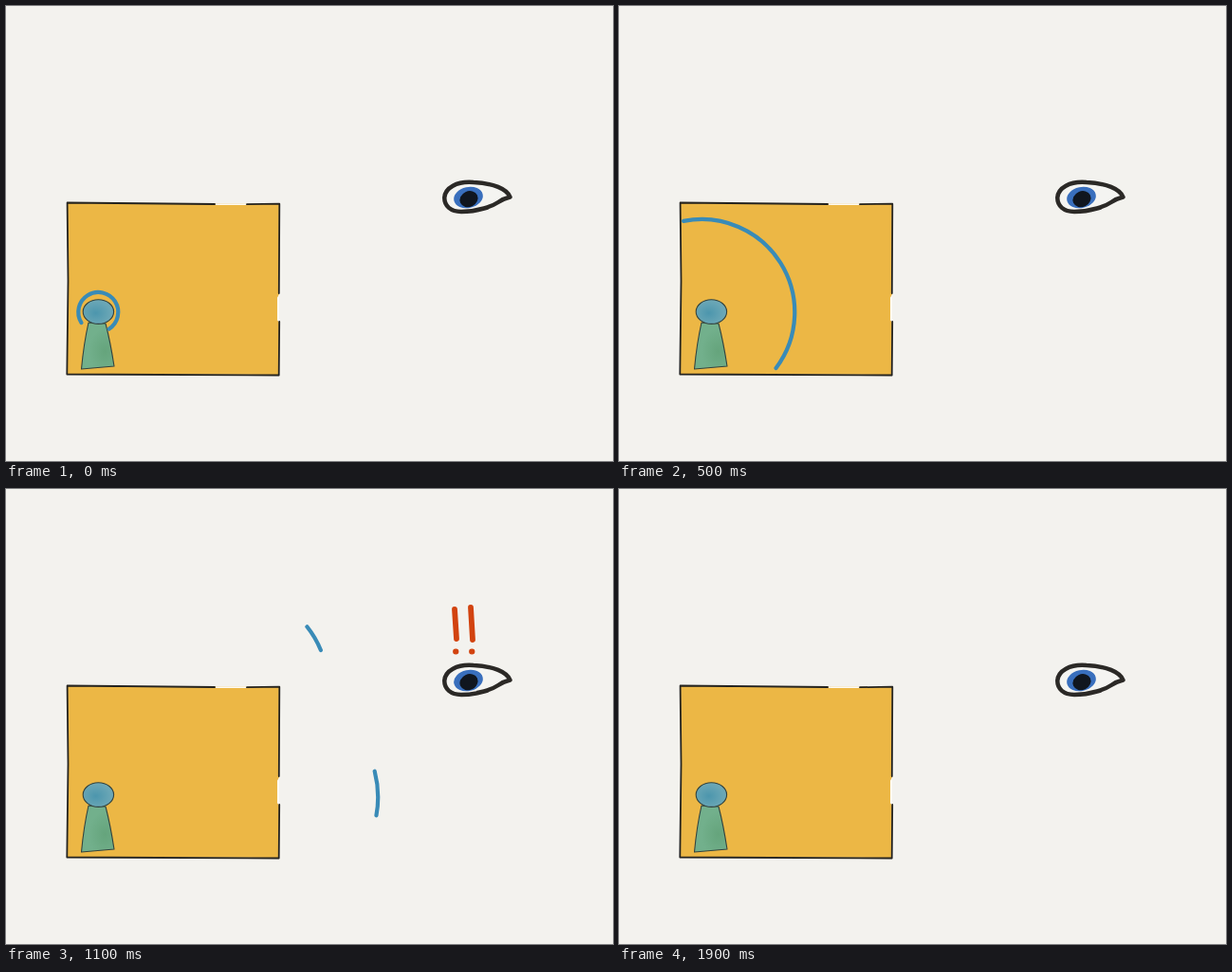
An HTML page that plays this animation: 640 by 480 pixels, repeating every 2000 ms.

```html
<!DOCTYPE html>
<html lang="en">
<head>
<meta charset="utf-8">
<title>Sound leaving a room</title>
<style>
  html, body { margin: 0; width: 100%; height: 100%; overflow: hidden; background: #f3f2ee; }
  svg { display: block; width: 100%; height: 100%; }
  path { stroke-linecap: round; stroke-linejoin: round; }
  .ink { fill: none; stroke: #24231f; stroke-width: 1.8; }
  .thin { stroke: #33433e; stroke-width: 1.1; }
  .wave { fill: none; stroke: #398bb7; stroke-width: 4.2; }
  .alert { fill: none; stroke: #d2430f; stroke-width: 5.8; }
</style>
</head>
<body>
<svg viewBox="0 0 640 480">
  <defs>
    <radialGradient id="head" cx=".42" cy=".55">
      <stop offset="0" stop-color="#4c96ad"/>
      <stop offset="1" stop-color="#6ba7b6"/>
    </radialGradient>
    <radialGradient id="robe" cx=".72" cy=".62">
      <stop offset="0" stop-color="#65a47c"/>
      <stop offset="1" stop-color="#72b08c"/>
    </radialGradient>
  </defs>

  <path fill="#ecb745" d="M65 208 288 209V304L286 308V331L288 334V389L65 388Z"/>
  <path fill="#fdfaf1" d="M286 308 288 305V333L286 331ZM221 208.5H254V210H221Z"/>
  <path class="ink" d="M220 209 64.600 207.500 65.500 290 64.300 388.500 287.700 389.500 288.200 333M254 209.200 288.300 208.700 287.800 303"/>

  <path class="thin" fill="url(#robe)" d="M87 334Q82 356 79.500 383L114 380Q110 354 105 335Z"/>
  <ellipse class="thin" fill="url(#head)" cx="97.400" cy="322.600" rx="16.200" ry="12.800"/>

  <path fill="#f4f4f1" stroke="#2b2926" stroke-width="4.500"
    d="M531.500 201.500C528 193 514 187 493 186C475 184.500 463 192 462.300 202C462 211 469 217 480 217C498 217 513 211 519 207Q525 203 531.500 201.500Z"/>
  <ellipse fill="#396fbd" cx="487.500" cy="202" rx="15.500" ry="11" transform="rotate(-12 487.500 202)"/>
  <ellipse fill="#10161f" cx="488" cy="203.700" rx="9.800" ry="8.300" transform="rotate(-25 488 203.700)"/>

  <path class="wave" id="wave"/>
  <path class="alert" id="alert"/>
</svg>
<script>
const STEP = 100, LOOP = 2000;
const LEFT = 68, TOP = 213, BOTTOM = 382, VOICE_Y = 323;
const radiusKeys = [[0, 21], [200, 42], [500, 98], [700, 182], [800, 215]];

// Wave pieces that spread from the two openings; angles in radians.
const doors = [
  { x: 237, y: 209, radius: 36, speed: 33.3, from: -0.67, to: -0.39, end: 1600 },
  { x: 284, y: 325, radius: 45, speed: 31.6, from: -0.255, to: 0.18, end: 1700 }
];

function arc(x, y, radius, from, to) {
  const point = angle => [x + radius * Math.cos(angle), y + radius * Math.sin(angle)];
  const large = to - from > Math.PI ? 1 : 0;
  return `M${point(from)}A${radius} ${radius} 0 ${large} 1 ${point(to)}`;
}

// The circle inside the room grows until the walls cut it off.
function roomWave(time) {
  const next = Math.max(1, radiusKeys.findIndex(key => key[0] >= time));
  const [[t0, r0], [t1, r1]] = radiusKeys.slice(next - 1, next + 1);
  const radius = r0 + (r1 - r0) * (time - t0) / (t1 - t0);
  const x = 100 - 0.13 * radius;
  const wall = (x - LEFT) / radius, ceiling = (VOICE_Y - TOP) / radius;
  let from = wall < 1 ? Math.acos(wall) - Math.PI : -3.7;
  if (ceiling < 1) from = Math.max(from, -Math.asin(ceiling));
  const to = Math.min(1, Math.asin(Math.min(1, (BOTTOM - VOICE_Y) / radius)));
  return arc(x, VOICE_Y, radius, from, to);
}

function waves(time) {
  if (time <= 800) return roomWave(time);
  return doors.filter(door => time <= door.end).map(door =>
    arc(door.x, door.y, door.radius + door.speed * (time - 900) / STEP, door.from, door.to)
  ).join("");
}

// Two exclamation marks that shrink while their dots rise.
function alertMarks(time) {
  if (time < 1100 || time > 1500) return "";
  const age = (time - 1100) / 300;
  return [473, 490].map((x, i) => {
    const top = 127 + 4 * age - 2 * i;
    const length = 31 + 3 * i - 18 * age;
    const dot = 171.5 - 20 * age;
    return `M${x} ${top}l${2 - 2 * age} ${length}M${x + 1} ${dot}h.5`;
  }).join("");
}

function draw() {
  const time = Math.floor(performance.now() % LOOP / STEP) * STEP;
  document.getElementById("wave").setAttribute("d", waves(time));
  document.getElementById("alert").setAttribute("d", alertMarks(time));
  requestAnimationFrame(draw);
}
draw();
</script>
</body>
</html>
```
